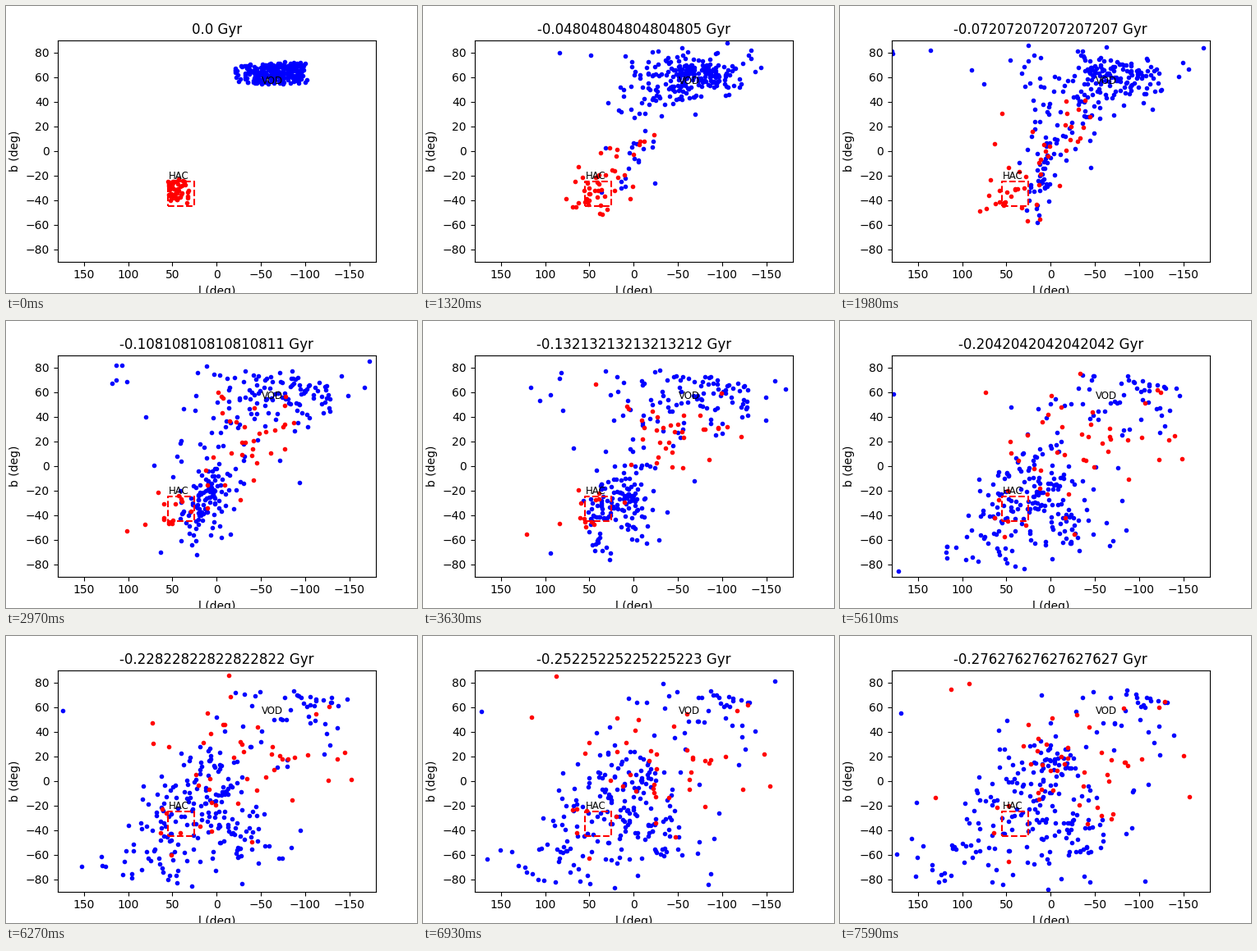
Recreate the animation shown at these times as a matplotlib script. Size 500x350 px, loop 7920 ms.

```python
import numpy as np
import matplotlib.pyplot as plt
from matplotlib.animation import FuncAnimation

FRAMES = 24
INTERVAL = 330          # ms
SUBSTEPS = 40
SUN = np.array([-8.1, 0.0, 0.0])   # kpc
V_CIRC, CORE = 212.0, 0.8          # kpc/Gyr, kpc
times = np.linspace(0, -4, 1000)[::3][:FRAMES]   # Gyr
rng = np.random.default_rng(7)


def sky_to_galaxy(l, b, dist):
    l, b = np.radians(l), np.radians(b)
    unit = np.column_stack([np.cos(b) * np.cos(l), np.cos(b) * np.sin(l), np.sin(b)])
    return SUN + dist[:, None] * unit


def galaxy_to_sky(pos):
    x, y, z = (pos - SUN).T
    return np.degrees(np.arctan2(y, x)), np.degrees(np.arctan2(z, np.hypot(x, y)))


def acceleration(pos):
    r2 = np.sum(pos**2, axis=1, keepdims=True)
    return -V_CIRC**2 * pos / (r2 + CORE**2)


def make_cloud(l, b, median_dist, radial_sd, tangential_sd):
    """Stars on mostly radial orbits, seen at the given sky positions."""
    n = len(l)
    pos = sky_to_galaxy(l, b, median_dist * np.exp(rng.normal(0, 0.36, n)))
    radial = pos / np.linalg.norm(pos, axis=1, keepdims=True)
    vel = rng.normal(0, tangential_sd, (n, 3))
    vel -= np.sum(vel * radial, axis=1, keepdims=True) * radial
    return pos, vel + rng.normal(0, radial_sd, (n, 1)) * radial


def sky_tracks(pos, vel):
    """Leapfrog orbits, returned as one (l, b) pair per frame."""
    dt = (times[0] - times[1]) / SUBSTEPS
    tracks = [galaxy_to_sky(pos)]
    for _ in range(FRAMES - 1):
        for _ in range(SUBSTEPS):
            vel = vel + acceleration(pos) * dt / 2
            pos = pos + vel * dt
            vel = vel + acceleration(pos) * dt / 2
        tracks.append(galaxy_to_sky(pos))
    return tracks


N_VOD, N_HAC = 250, 48
vod = sky_tracks(*make_cloud(-13 - 90 * rng.beta(1.9, 1.5, N_VOD),
                             54 + 18.5 * rng.beta(1.9, 1.7, N_VOD), 17.5, 155, 55))
hac = sky_tracks(*make_cloud(55 - 27 * rng.beta(1.1, 1.9, N_HAC),
                             -22.5 - 22.5 * rng.beta(1.2, 1.6, N_HAC), 16, 145, 55))

fig, ax = plt.subplots(figsize=(5, 3.5), dpi=100)
ax.set(xlim=(180, -180), ylim=(-90, 90), xlabel="l (deg)", ylabel="b (deg)")
vod_dots, = ax.plot([], [], "b.")
hac_dots, = ax.plot([], [], "r.")
ax.plot([55, 25, 25, 55, 55], [-45, -45, -25, -25, -45], "r--")
ax.text(54, -23, "HAC", fontsize=8.5)
ax.text(-51, 54.7, "VOD", fontsize=8.5)
title = ax.set_title("")


def update(frame):
    vod_dots.set_data(*vod[frame])
    hac_dots.set_data(*hac[frame])
    title.set_text(f"{times[frame]} Gyr")
    return vod_dots, hac_dots, title


anim = FuncAnimation(fig, update, frames=FRAMES, interval=INTERVAL,
                     repeat=True, repeat_delay=0)
plt.show()
```
